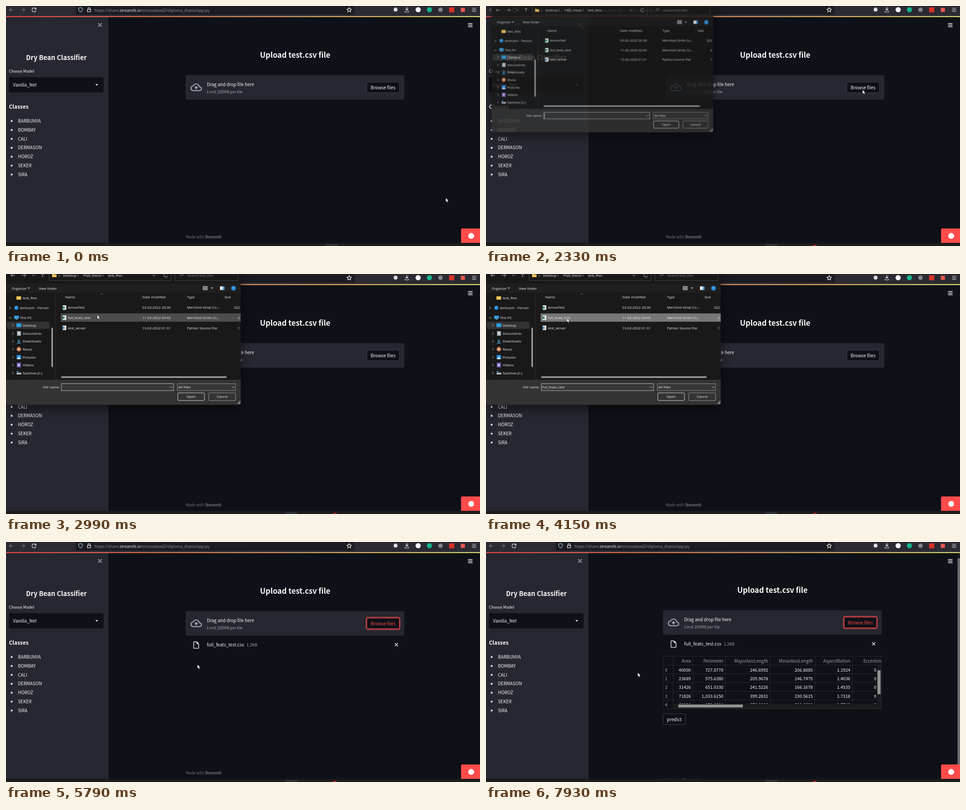
An HTML page that plays this animation: 1050x533 px, repeating every 7.99 s.

```html
<!DOCTYPE html>
<html lang="en">
<head>
<meta charset="utf-8">
<title>Dry Bean Classifier</title>
<style>
html, body { margin: 0; width: 100%; height: 100%; overflow: hidden; background: #0e1117; }
svg { display: block; width: 1050px; height: 533px; }
text { font: 9.85px "Noto Sans CJK JP", "Noto Sans CJK SC", "Noto Sans", sans-serif; fill: #fafafa; white-space: pre; }
.small { font-size: 8.6px; }
.bold { font-weight: 700; }
.mid { text-anchor: middle; }
.end { text-anchor: end; }
.dim { fill: #a0a2a8; }
.cell { font-size: 9.7px; }
.ui text { font: 7.8px "Open Sans", "Noto Sans", sans-serif; fill: #f0f0f0; }
.line { fill: none; stroke: #fafafa; stroke-width: 1.2; }
.ui .line { stroke: #ddd; stroke-width: .9; }
.thin { fill: none; stroke: #fafafa; stroke-opacity: .1; }

.a { animation: 7.99s step-end infinite; }
#cursor { animation-name: move; animation-timing-function: ease-in-out; }
#dialog { animation-name: dialog; animation-timing-function: linear; transform-origin: 219px 111px; filter: drop-shadow(0 9px 12px rgba(0,0,0,.45)); }
#rec { animation-name: rec; animation-timing-function: linear; }
#task { animation-name: task; }
#main { animation-name: shift; }
#browse { animation-name: hover; }
#ring { animation-name: ring; }
#file { animation-name: file; }
#table, #pageBar { animation-name: table; }
#thumb { animation-name: thumb; }
#foot { animation-name: foot; }
#run { animation-name: run; }
#step1 { animation-name: step1; }
#step2 { animation-name: step2; }
#row1 { animation-name: row1; }
#row2 { animation-name: row2; }
#name { animation-name: name; }
#mark { animation-name: mark; }
#caret { animation-name: caret; }
#open { animation-name: open; }

@keyframes move {
  0%, 6.63% { transform: translate(974px, 426px); }
  16.27%, 17.15% { transform: translate(856px, 245px); }
  24.4%, 30.3% { transform: translate(834px, 186px); }
  37.3%, 38.67% { transform: translate(202px, 91px); }
  41.3% { transform: translate(184px, 97px); }
  44.6%, 53.7% { transform: translate(179px, 98px); }
  56.1% { transform: translate(115px, 122px); animation-timing-function: ease-in; }
  59.1% { transform: translate(220px, 196px); animation-timing-function: ease-out; }
  62.9%, 88.6% { transform: translate(424px, 272px); }
  92.6% { transform: translate(324px, 296px); }
  94.9%, 96.6% { transform: translate(332px, 292px); }
  99%, 100% { transform: translate(336px, 290px); }
}
@keyframes dialog {
  0%, 27.4% { opacity: 0; transform: scale(.9); }
  29.1%, 30.2% { opacity: .85; transform: scale(.9435); }
  31.1%, 67.4% { opacity: 1; transform: none; }
  69.1%, 100% { opacity: 0; transform: scale(.9); }
}
@keyframes rec { 0%, 1.37% { transform: translateY(4px); } 4%, 100% { transform: none; } }
@keyframes task { 0% { transform: translateX(90px); } 24.8%, 100% { transform: none; } }
@keyframes shift { 0% { transform: none; } 86.6% { transform: translate(-6px, 0); } 96.7% { transform: translate(-6px, -1px); } 98%, 100% { transform: translate(-6px, -2px); } }
@keyframes hover {
  0% { fill: #fafafa; stroke: #3d4047; }
  22.3% { fill: #ff4b4b; stroke: #ff4b4b; }
  27.5% { fill: #fafafa; stroke: #3d4047; }
  68.3%, 100% { fill: #ff4b4b; stroke: #ff4b4b; }
}
@keyframes ring { 0% { opacity: 0; } 24.8% { opacity: 1; } 27.5% { opacity: 0; } 68.3%, 100% { opacity: 1; } }
@keyframes file { 0% { opacity: 0; } 70.8%, 100% { opacity: 1; } }
@keyframes table { 0% { opacity: 0; } 86.6%, 100% { opacity: 1; } }
@keyframes thumb { 0% { transform: translateY(-2px); } 98%, 100% { transform: none; } }
@keyframes foot { 0% { transform: none; } 86.6%, 100% { transform: translateY(18px); } }
@keyframes run { 0% { opacity: 0; } 77.4% { opacity: 1; } 86.6%, 100% { opacity: 0; } }
@keyframes step1 { 0% { opacity: 1; } 83.2%, 100% { opacity: 0; } }
@keyframes step2 { 0% { opacity: 0; } 83.2%, 100% { opacity: 1; } }
@keyframes row1 { 0% { fill: #191919; } 36.8% { fill: #4d4d4d; } 48.7% { fill: #777; } 63.8%, 100% { fill: #333; } }
@keyframes row2 { 0% { fill: #191919; } 55.4% { fill: #4d4d4d; } 56.7%, 100% { fill: #191919; } }
@keyframes name { 0% { opacity: 0; } 41.7%, 100% { opacity: 1; } }
@keyframes mark { 0% { opacity: 0; } 63.8%, 100% { opacity: 1; } }
@keyframes caret { 0% { opacity: 1; } 34.2%, 100% { opacity: 0; } }
@keyframes open { 0% { fill: #333; } 62%, 100% { fill: #666; } }
</style>
</head>
<body>
<svg viewBox="0 0 1050 533">
  <defs>
    <linearGradient id="deco"><stop stop-color="#ff4b4b"/><stop offset="1" stop-color="#fffd80"/></linearGradient>
    <clipPath id="grid"><rect x="392" y="253" width="484.500" height="118"/></clipPath>
    <clipPath id="rows"><rect x="392" y="253" width="484" height="106"/></clipPath>
  </defs>

  <!-- page -->
  <rect width="1050" height="533" fill="#0e1117"/>
  <rect y="22" width="227" height="511" fill="#262730"/>
  <g id="side">
    <path class="line" d="M204 38l8 8m0-8l-8 8" style="stroke:#8b8d94;stroke-width:2"/>
    <text class="bold mid" x="111.500" y="120" style="font-size:14.6px">Dry Bean Classifier</text>
    <text x="6.500" y="148" style="font-size:8.5px">Choose Model</text>
    <rect x="6.500" y="158" width="209.500" height="34" rx="3" fill="#0e1117"/>
    <text x="15.500" y="179">Vanilla_Net</text>
    <path d="M198 173.500h6l-3 3.400z" fill="#fafafa"/>
    <text class="bold" x="6.500" y="228" style="font-size:11.95px">Classes</text>
  </g>

  <g id="main" class="a">
    <text class="bold mid" x="640.500" y="114.500" style="font-size:16.7px">Upload test.csv file</text>
    <rect x="398" y="153.500" width="484.500" height="54.500" rx="3" fill="#262730"/>
    <path transform="translate(408.800 168) scale(1.05)" fill="#a9adb8" d="M19.35 10.040A7.490 7.490 0 0012 4C9.110 4 6.600 5.640 5.350 8.040A5.994 5.994 0 000 14c0 3.310 2.690 6 6 6h13c2.760 0 5-2.240 5-5 0-2.640-2.050-4.780-4.650-4.960zM19 18H6c-2.210 0-4-1.790-4-4 0-2.050 1.530-3.760 3.560-3.970l1.070-.110.500-.950A5.469 5.469 0 0112 6c2.620 0 4.880 1.860 5.390 4.430l.300 1.500 1.530.110A2.980 2.980 0 0122 15c0 1.650-1.350 3-3 3zM8 13h2.550v3h2.900v-3H16l-4-4z"/>
    <text x="445" y="177.500">Drag and drop file here</text>
    <text class="small dim" x="445" y="194.300">Limit 200MB per file</text>
    <rect id="ring" class="a" x="798" y="167.300" width="74.500" height="27" rx="3.500" fill="none" stroke="#ff4b4b" stroke-opacity=".55" stroke-width="2.500"/>
    <g id="browse" class="a">
      <rect x="799.300" y="169" width="72" height="23.600" rx="2.500" style="fill:#0e1117"/>
      <text class="mid" x="835.300" y="185" style="fill:inherit;stroke:none">Browse files</text>
    </g>
    <g id="file" class="a">
      <path transform="translate(411.700 219.200) scale(.8)" fill="#d5d7dd" d="M14 2H6c-1.100 0-2 .900-2 2v16c0 1.100.900 2 2 2h12c1.100 0 2-.900 2-2V8zM6 20V4h7v5h5v11z"/>
      <text x="445" y="232">full_feats_test.csv</text>
      <text class="dim" x="533" y="232" style="font-size:8.7px">1.2KB</text>
      <path class="line" d="M861.300 224.500l7 7m0-7l-7 7"/>
    </g>
    <g id="table" class="a"><g transform="translate(6 2)">
      <g clip-path="url(#grid)">
        <g id="cells" clip-path="url(#rows)"></g>
        <path d="M414.500 359H876v11H414.500zM867 274h9v85h-9z" fill="#1b1c1f"/>
        <path d="M426 361h143v6.500H426zM867 285h7v53h-7z" fill="#929292"/>
        <rect class="thin" x="392.500" y="253.500" width="483.500" height="117"/>
      </g>
      <rect x="392.500" y="381.500" width="49.500" height="24" rx="2.500" fill="#0e1117" stroke="#3d4047"/>
      <text class="mid" x="417.200" y="397.500">predict</text>
    </g></g>
    <text id="foot" class="a" x="398" y="516" style="font-size:8.45px;fill:#6e7075">Made with <tspan fill="#a5a6a9">Streamlit</tspan></text>
  </g>

  <g id="run" class="a">
    <g class="dim" stroke="#c8c9cc" stroke-width="1.400" fill="none">
      <circle cx="901" cy="36" r="1.200"/>
      <path id="step1" class="a" d="M895 40l5-1-2 5 4 2v4M898 44l-2 3h-4M900 39l2 3h3"/>
      <path id="step2" class="a" d="M896 42l4-3-1 5 2 3-2 3M899 44l-2 5h-2M900 39l1 4h3"/>
    </g>
    <text class="small dim" x="911" y="45.500">Running...</text>
    <rect x="972" y="32" width="36" height="20" rx="2.500" fill="#0e1117" stroke="#3d4047"/>
    <text class="small mid" x="990" y="45.500">Stop</text>
  </g>
  <path class="line" d="M1023.500 39h10m-10 3.500h10m-10 3.500h10" style="stroke-width:1.300"/>
  <g id="pageBar" class="a">
    <rect x="1044" y="24" width="6" height="502" fill="#17181c"/>
    <rect id="thumb" class="a" x="1044.500" y="36" width="5.500" height="459" fill="#6b6b6d"/>
  </g>
  <path d="M1050 494h-39q-3 0-3 3v29h42z" fill="#ff4b4b"/>
  <circle cx="1030.500" cy="510.500" r="6.500" fill="#fff"/>

  <!-- browser bar -->
  <rect width="1050" height="22.500" fill="#2b2a33"/>
  <path d="M154 0h618v16q0 3-3 3H157q-3 0-3-3z" fill="#1c1b22"/>
  <rect y="22.500" width="1050" height="2" fill="url(#deco)"/>
  <g class="line">
    <path d="M17 8.500H7.500m4-4l-4 4 4 4M32 8.500h9.500m-4-4l4 4-4 4" stroke="#74737c"/>
    <path d="M66 6.500a4.500 4.500 0 1 0 .400 3.500M66.500 3.500v3.500H63"/>
    <path d="M165 3.500l4.300 1.500q.300 6-4.300 8.500-4.600-2.500-4.300-8.500z" stroke="#9fc7e8"/>
    <path d="M180.500 7.500h7v5.500h-7zM182 7.500V5.500a2 2 0 0 1 4 0v2"/>
    <path d="M760.300 3.500l1.500 3.200 3.500.500-2.600 2.400.700 3.500-3.100-1.700-3.100 1.700.700-3.500-2.600-2.400 3.500-.500z"/>
    <path d="M888 2.500v7m-3-3l3 3 3-3M884 11v2h8v-2M1032.500 5h9m-9 3.500h9m-9 3.500h9"/>
  </g>
  <circle cx="863" cy="8" r="4.500" fill="#d8d8dc"/>
  <circle cx="913" cy="8.300" r="5.700" fill="#fff"/>
  <circle cx="938" cy="8.300" r="5.700" fill="#15b58f"/>
  <circle cx="962.500" cy="8.300" r="5" fill="#85858b"/>
  <rect x="981.500" y="3" width="11.500" height="11" fill="#d8322b"/>
  <rect x="1007.500" y="4" width="9" height="9" fill="#e5594f"/>
  <g class="ui"><text x="196" y="12.800" style="font-size:8.9px;fill:#97969f">https://share.<tspan fill="#fbfbfe">streamlit.io</tspan>/miroselwa42/diploma_thesis/app.py</text></g>

  <!-- file dialog -->
  <g id="dialog" class="a ui">
    <rect y="-40" width="520" height="330.500" rx="6" fill="#191919"/>
    <path d="M0 21h520v20H0z" fill="#1f1f1f"/>
    <path d="M0 235h520v49.500q0 6-6 6H6q-6 0-6-6z" fill="#333"/>
    <path class="line" d="M110 41v194M298 43v17M397 43v17M480 43v17" style="stroke:#343434"/>
    <path class="line" d="M95.500-12v26.500h270.500V-12M374.500-12v26.500h139V-12" style="stroke:#484848"/>
    <g class="line">
      <path d="M20 3h-9m3.500-3.500L11 3l3.500 3.500M35 3h9m-3.500-3.500L44 3l-3.500 3.500M58 1.500l3 3 3-3M81 7V-2m-3.500 3.500L81-2l3.500 3.500M325 1.500l3 3 3-3M357.500 1a4 4 0 1 0 .500 3"/>
      <path d="M158 .500l2.500 2.500-2.500 2.500M214 .500l2.500 2.500-2.500 2.500" style="stroke:#aaa"/>
      <path d="M209.500 45.500l2.500-2.300 2.500 2.300M385 6l3-3" style="stroke:#888"/>
      <circle cx="390" cy="1" r="2.500" style="stroke:#888"/>
    </g>
    <path d="M102 0h4l1 1h5v6h-10z" fill="#f0c35a"/>
    <text x="116" y="5.500" style="fill:#aaa">«</text>
    <text x="126" y="5.800">Desktop</text><text x="171" y="5.800">PGD_thesis</text><text x="226" y="5.800">test_files</text>
    <text x="402" y="5.800" style="fill:#858585">Search test_files</text>
    <text x="12.500" y="34.500">Organize</text><text x="73" y="34.500">New folder</text>
    <path d="M48 30h5l-2.500 3zM453.500 30h5l-2.500 3z" fill="#ccc"/>
    <path d="M436 27h10.500v9H436z" fill="#aaa"/>
    <path class="line" d="M437 29.500h8.500m-8.500 2.500h8.500m-8.500 2.500h8.500" style="stroke:#333"/>
    <path d="M474 27.500h6v8h-6z" fill="#eee"/><path d="M480 27.500h4v8h-4z" fill="#4ba3e3"/>
    <circle cx="504" cy="31.500" r="5.300" fill="#2589d2"/><text class="mid" x="504" y="34.400">?</text>

    <rect x="2" y="106" width="94.500" height="16" rx="1" fill="#333"/>
    <g id="nav"></g>
    <rect x="100.500" y="119" width="3.500" height="88" rx="1.700" fill="#9a9a9a"/>

    <text x="131" y="54.300">Name</text><text x="302" y="54.300">Date modified</text><text x="401" y="54.300">Type</text><text x="484" y="54.300">Size</text>
    <rect id="row1" class="a" x="121" y="87.500" width="399" height="18.500"/>
    <rect id="row2" class="a" x="121" y="110.500" width="399" height="18.500"/>
    <g id="files"></g>
    <rect x="122" y="227.300" width="367" height="3.400" rx="1.700" fill="#9f9f9f"/>

    <text class="end" x="119" y="254.300">File name:</text>
    <rect x="122.500" y="243.500" width="248.500" height="15.500" fill="#383838" stroke="#bbb"/>
    <rect id="mark" class="a" x="124" y="246" width="50.500" height="11" fill="#0b72cf"/>
    <text id="name" class="a" x="124.500" y="254.300">full_feats_test</text>
    <rect id="caret" class="a" x="124" y="246" width=".8" height="11" fill="#fff"/>
    <rect x="379.500" y="243.500" width="129" height="15.500" fill="#383838" stroke="#8c8c8c"/>
    <text x="382" y="254.300">All Files</text>
    <path class="line" d="M363 250l2.500 2.500 2.500-2.500M500.500 250l2.500 2.500 2.500-2.500"/>
    <rect id="open" class="a" x="380.500" y="264" width="59" height="17" rx="2" stroke="#d8d8d8"/>
    <rect x="449" y="264" width="59.500" height="17" rx="2" fill="#333" stroke="#9b9b9b"/>
    <text class="mid" x="410" y="275.300">Open</text><text class="mid" x="479" y="275.300">Cancel</text>
    <path d="M512.500 287h1.600v1.600h-1.600zm2.500 0h1.600v1.600H515zm2.500 0h1.600v1.600h-1.600zm-2.500-2.500h1.600v1.600H515zm2.500 0h1.600v1.600h-1.600zm0-2.500h1.600v1.600h-1.600z" fill="#ddd"/>
  </g>

  <!-- taskbar -->
  <rect y="526" width="1050" height="7" fill="#1c1c1d"/>
  <rect id="task" class="a" x="618" y="528.500" width="27.500" height="10" rx="2.500" fill="#2f3037"/>
  <circle id="rec" class="a" cx="728.500" cy="536.500" r="6" fill="#d92b2b"/>

  <path id="cursor" class="a" d="M0 0v9.200l2.100-1.900 1.500 3.300 1.700-.800-1.500-3.200h2.900z" fill="#fff" stroke="#000" stroke-width=".6"/>
</svg>
<script>
const $ = id => document.getElementById(id);
const add = (id, html) => $(id).insertAdjacentHTML('beforeend', html);
const label = (x, y, s, cls = '') => `<text class="${cls}" x="${x}" y="${y}">${s}</text>`;
const box = (x, y, w, h, fill) => `<rect x="${x}" y="${y}" width="${w}" height="${h}" rx="1" fill="${fill}"/>`;
const dot = (x, y, r, fill) => `<circle cx="${x}" cy="${y}" r="${r}" fill="${fill}"/>`;
const path = (d, cls = 'line') => `<path class="${cls}" d="${d}"/>`;

['BARBUNYA', 'BOMBAY', 'CALI', 'DERMASON', 'HOROZ', 'SEKER', 'SIRA'].forEach((s, i) => {
  const y = 255.2 + i * 19.8;
  add('side', dot(12.5, y + .3, 2.1, '#fafafa') + label(26.5, y + 3.8, s));
});

const icon = {
  folder: y => box(23, y - 3.5, 10.5, 7.5, '#f0c35a'),
  cloud: y => dot(23, y, 4.5, '#2f93dd'),
  pc: y => box(18, y - 4.5, 10.5, 7, '#3aa0dc') + box(21, y + 3, 4.5, 1.2, '#bbb'),
  desk: y => box(23, y - 4.5, 11, 8.5, '#2f9bdc'),
  doc: y => box(24.5, y - 5, 8.5, 10, '#a9b7c2') + path(`M26.500 ${y - 2}h4.500m-4.500 2h4.500m-4.500 2h4.500`),
  down: y => `<path d="M28.500 ${y - 5}v7m-3-3l3 3 3-3M24.500 ${y + 4.5}h8" fill="none" stroke="#4ba3e3" stroke-width="1.300"/>`,
  music: y => dot(28.5, y, 5, '#c98258') + dot(28.5, y, 1.7, '#f4d9c6'),
  pic: y => box(23.5, y - 4.8, 10, 9.5, '#2f8fdd') + `<path d="M24 ${y + 4.2}l4.500-5 4.500 5z" fill="#e8f3fb"/>`,
  video: y => box(24, y - 5, 9, 10, '#8468c9') + `<path d="M27 ${y - 2.5}v5l4-2.500z" fill="#fff"/>`,
  drive: y => box(23.5, y - 1, 10.5, 4, '#b9bdc2') + box(23.5, y - 4.5, 4, 2.5, '#3aa0dc')
};
[
  ['test_files', 53, 'folder', 37], ['AirHutch - Person', 75, 'cloud', 31, 9], ['This PC', 97, 'pc', 31, -1],
  ['Desktop', 114, 'desk', 37, 15], ['Documents', 132, 'doc', 37, 15], ['Downloads', 149.5, 'down', 37, 15],
  ['Music', 167, 'music', 37, 15], ['Pictures', 184.7, 'pic', 37, 15], ['Videos', 202.3, 'video', 37, 15],
  ['Sashlow (C:)', 220, 'drive', 37, 15]
].forEach(([s, y, kind, x, arrow]) => {
  const chevron = arrow < 0 ? `M6.500 ${y - 1.2}l2.700 2.500 2.700-2.500` : `M${arrow - 1.3} ${y - 2.6}l2.600 2.600-2.600 2.600`;
  add('nav', (arrow ? path(chevron) : '') + icon[kind](y) + label(x, y + 2.8, s));
});

const sheet = 'Merrilost Grids Co...';
[
  ['AnovaTest', '03-02-2022 20:30', sheet, 322, '#1f8a50'],
  ['full_feats_test', '11-02-2022 03:45', sheet, 2, '#1f8a50'],
  ['test_server', '13-02-2022 01:31', 'Python Source File', 1, '#3f7fb8']
].forEach(([name, date, type, size, color], i) => {
  const y = 74.4 + i * 22.6, base = y + 2.9;
  add('files', box(125.5, y - 5, 8, 10, '#eee') + box(125, y - 2.5, 5, 5, color) +
    label(137, base, name) + label(302, base, date) + label(401, base, type) + label(518, base, size, 'end'));
});

const right = [454, 526, 625, 724, 807, 865];
const top0 = 273.5, rowH = 19.35;
['Area', 'Perimeter', 'MajorAxisLength', 'MinorAxisLength', 'AspectRation'].forEach((s, i) =>
  add('cells', label(right[i], 268, s, 'cell dim end')));
add('cells', label(836, 268, 'Eccentricity', 'cell dim'));
[
  ['40000', '727.8770', '246.6992', '206.8885', '1.1924', 0],
  ['23689', '575.6380', '205.9678', '146.7475', '1.4036', 0],
  ['31426', '651.0330', '241.5226', '166.1678', '1.4535', 0],
  ['71826', '1,033.6150', '399.2831', '230.5615', '1.7318', 0],
  ['69806', '979.8810', '376.0818', '211.8680', '1.7740', 0]
].forEach((row, i) => {
  const y = top0 + i * rowH;
  add('cells', path(`M392 ${y}h484`, 'thin') + row.map((v, j) => label(right[j], y + 14, v, 'cell end')).join(''));
  add('side', '');
});
add('cells', path([414.5, 458.5, 530.5, 629.5, 728.5, 811.5].map(x => `M${x} 254v117`).join(''), 'thin'));
for (let i = 0; i < 5; i++) {
  const y = top0 + i * rowH;
  $('cells').parentNode.insertAdjacentHTML('beforeend', label(396.5, y + 14, i, 'cell dim'));
}
</script>
</body>
</html>
```
